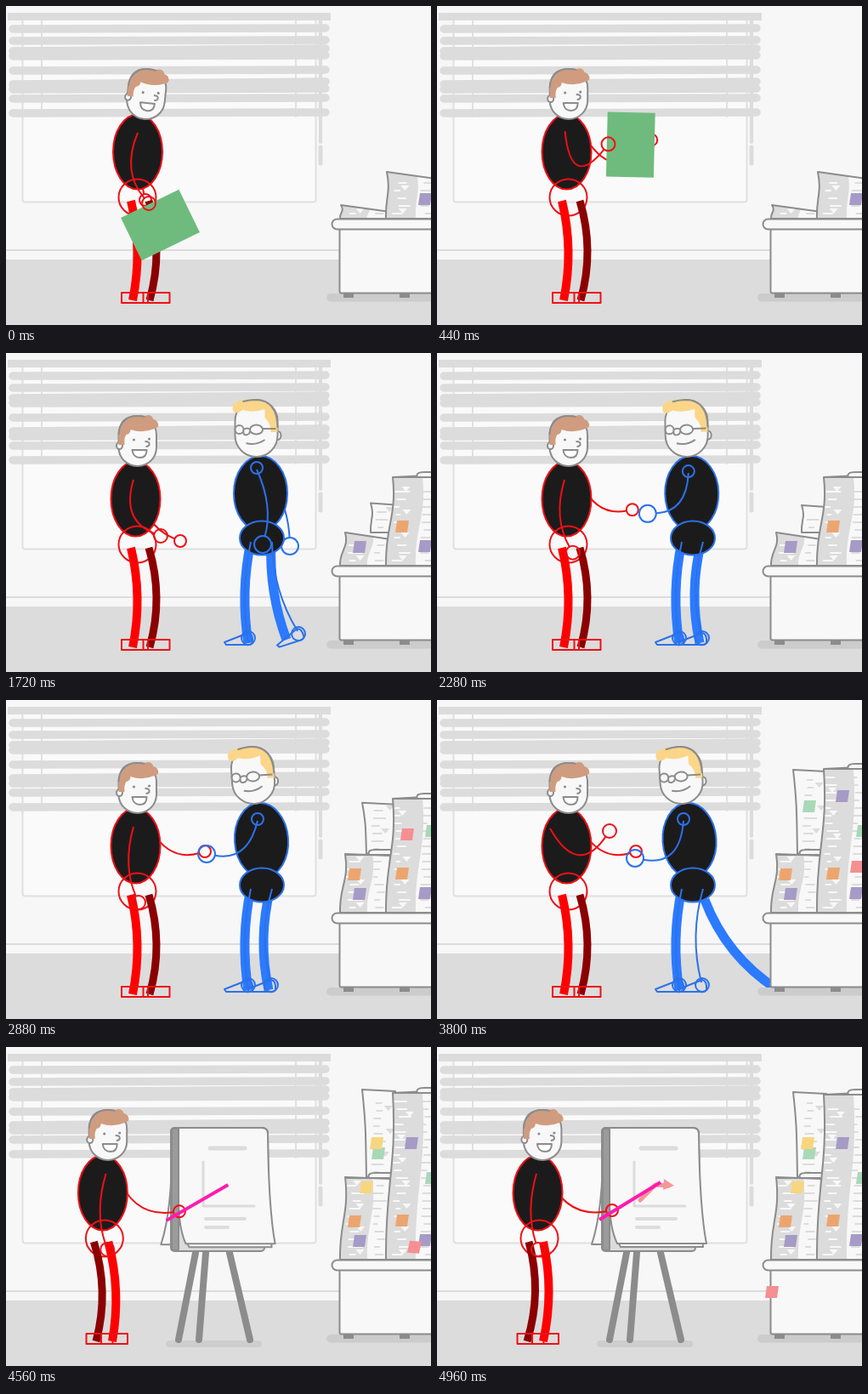
Write an HTML page with a canvas that moves like this. It is 500 px wide and 375 px high and loops after 5 s.

```html
<!DOCTYPE html>
<html lang="en">
<head>
<meta charset="utf-8">
<title>Office</title>
<style>
html, body { margin: 0; width: 100%; height: 100%; overflow: hidden; background: #f7f7f7; }
canvas { display: block; width: 500px; height: 375px; }
</style>
</head>
<body>
<canvas id="stage" width="500" height="375"></canvas>
<script>
const c = document.getElementById('stage').getContext('2d');
const LOOP = 5000, STEP = 40;
const INK = '#8c8c8c', PALE = '#dcdcdc', WHITE = '#f8f8f8', BLACK = '#1c1b1c';
const RED = '#ee1015', BLUE = '#2b72ea', BRIGHT = '#2b7aff';
const PURPLE = '#a69bc6', ORANGE = '#eda56f', GREEN = '#a9d8b8', YELLOW = '#f8d67e', PINK = '#f58f91';
const start = performance.now();
let t = 0;

// Timing: every move is an eased ramp from time a to time b.
const part = (a, b) => Math.max(0, Math.min(1, (t - a) / (b - a)));
function ramp(a, b) {
  const u = part(a, b);
  return u * u * (3 - 2 * u);
}
function pop(a, length = 420) {
  const u = part(a, a + length) - 1;
  return 1 + 2.7 * u ** 3 + 1.7 * u ** 2;
}
// Passes through poses; each move is [from, to, pose].
const pose = (first, ...moves) => moves.reduce(
  (now, [a, b, next]) => now.map((v, i) => v + (next[i] - v) * ramp(a, b)), first);
const noise = n => { const v = Math.sin(n * 12.9898) * 43758.5453; return v - Math.floor(v); };

function paint(fill, stroke, width = 2) {
  if (fill) { c.fillStyle = fill; c.fill(); }
  if (stroke) { c.strokeStyle = stroke; c.lineWidth = width; c.stroke(); }
}
function shape(d, fill, stroke, width = 2) {
  const p = new Path2D(d);
  if (fill) { c.fillStyle = fill; c.fill(p); }
  if (stroke) { c.strokeStyle = stroke; c.lineWidth = width; c.stroke(p); }
}
function line(x1, y1, x2, y2, color, width, cap = 'round') {
  c.lineCap = cap;
  c.beginPath(); c.moveTo(x1, y1); c.lineTo(x2, y2);
  paint(null, color, width);
}
function oval(x, y, rx, ry, fill, stroke) {
  c.beginPath(); c.ellipse(x, y, rx, ry, 0, 0, 7);
  paint(fill, stroke);
}
function box(x, y, w, h, r, fill, stroke) {
  c.beginPath(); c.roundRect(x, y, w, h, r);
  paint(fill, stroke);
}
function at(x, y, angle, draw) {
  c.save(); c.translate(x, y); c.rotate(angle * Math.PI / 180); draw(); c.restore();
}

// A rubber limb, bent sideways from its straight line and cut short by gap.
function limb([x, y, ex, ey, bend], color, width = 2, gap = 0) {
  const d = Math.hypot(ex - x, ey - y);
  const mx = (x + ex) / 2 - (ey - y) / d * bend, my = (y + ey) / 2 + (ex - x) / d * bend;
  const k = gap / Math.hypot(ex - mx, ey - my);
  c.lineCap = 'butt';
  c.beginPath(); c.moveTo(x, y);
  c.quadraticCurveTo(mx, my, ex - (ex - mx) * k, ey - (ey - my) * k);
  paint(null, color, width);
}
function arm(p, r, color) {
  limb(p, color, 2, r);
  oval(p[2], p[3], r, r, null, color);
}

function room() {
  c.fillStyle = '#f7f7f7'; c.fillRect(0, 0, 500, 375);
  c.fillStyle = PALE; c.fillRect(0, 298, 500, 77);
  line(0, 287, 500, 287, PALE, 2);
  box(19.5, 10, 345, 220.5, 3, '#fafafa', '#e0e0e0');
  for (const x of [42, 341]) line(x, 17, x, 130, '#e0e0e0', 2);
  c.fillStyle = PALE; c.fillRect(2, 8, 380, 9);
  for (const y of [27, 41, 59, 76, 98, 109, 126]) line(8, y, 376, y - 1, PALE, 9.5);
  for (const y of [53, 92]) line(8, y, 376, y - 3, PALE, 9.5);
  line(370, 17, 370, 160, PALE, 4);
  line(370, 166, 370, 185, PALE, 5);
}

const shake = () => t > 2650 && t < 3800 ? 5 * Math.sin((t - 2880) / 460 * 2 * Math.PI) : 0;

function redHead(x, angle) {
  at(x, 104, angle, () => {
    box(-22, -30, 44.5, 59, 22, WHITE, INK);
    oval(-21, 5, 3.5, 4, WHITE, INK);
    shape('M-22 4H-15Q-16-4-13-8Q-8-9-8-14Q6-9 20-15Q27-17 24-22Q23-25 19-26Q16-33 9-30Q-14-34-22-10Z', '#cf9c7f');
    shape('M-22-8Q-21-30 0-30Q6-30 9-29', null, INK);
    oval(-4, -2, 1.6, 1.6, INK);
    oval(14, -3, 1.6, 1.6, INK);
    shape('M9 0Q15 0 14 4Q13 6 10 6', null, INK);
    shape('M-6 10H11Q11 19 3 19Q-5 19-6 10Z', '#fff', INK);
  });
}

function redMan() {
  const unwind = 1 - ramp(0, 480);
  const retreat = ramp(4060, 4470), back = ramp(3940, 4470);
  const shift = 6 * ramp(4480, 4740) - 40 * retreat;
  const body = 152.5 + 2.5 * unwind + shift, hip = 154.5 + shift;

  const rear = pose([165, 150, 164, 228, 10],
    [0, 560, [172, 148, 264, 148, 65]],
    [1240, 1680, [160, 150, 205, 221, 30]],
    [1900, 2400, [172, 155, 234, 178, 25]],
    [3840, 4140, [150, 150, 152, 227, 10]],
    [4260, 4600, [130, 150, 206, 192, 35]]);
  rear[3] += shake();
  arm(rear, 7, RED);
  oval(body, 171.5, 29, 44, BLACK, RED);
  oval(hip, 225, 22, 21.5, null, RED);

  const darkFoot = 169 - 63 * back, foot = 149 - 24 * retreat;
  limb([hip + 13.5 - 26 * retreat, 229, darkFoot, 346, -17], '#8b0000', 9);
  limb([hip - 7.5 + 12 * retreat, 229, foot, 346, -13], '#f00', 10);
  box(foot - 13, 337, 31, 12, 0, null, RED);
  at(darkFoot + 8 - 4 * back, 343, 15 * Math.sin(Math.PI * back), () => box(-15.5, -6, 31, 12, 0, null, RED));

  const lift = ramp(0, 560), gone = ramp(1240, 1740);
  if (gone < 1) {
    at(181.5 + 52.5 * lift - 2 * gone, 257.5 - 107 * lift - 28 * gone, 64 - 71 * lift, () => {
      c.scale(1 - gone, 1 - gone);
      c.fillStyle = '#6fbb7d'; c.fillRect(-28, -38, 56, 76);
    });
  }
  arm(pose([155, 149, 168, 232, 26],
    [0, 560, [150, 147, 206, 153, 70]],
    [1240, 1680, [150, 149, 182, 215, 34]],
    [1900, 2400, [150, 149, 156, 238, 16]],
    [3300, 3700, [133, 151, 203, 154, 56]],
    [3860, 4160, [132, 149, 125, 237, 17]],
    [4240, 4600, [117, 149, 119, 238, 14]]), 8, RED);
  redHead(154.5 + 10.5 * unwind + 0.9 * shift, 6 * unwind);

  if (t >= 3960) {
    const [x1, y1, x2, y2] = pose([133, 226, 218, 235], [4260, 4600, [191, 203, 263, 159]]);
    line(x1, y1, x2, y2, '#ff1cae', 4, 'butt');
  }
}

function blueHead(x, angle) {
  at(x, 88, angle, () => {
    oval(25, 9, 4, 5, WHITE, INK);
    box(-25, -33, 50, 67, 25, WHITE, INK);
    shape('M-27-19Q-31-30-18-32Q-8-35 0-33Q23-33 25-8V5H17Q18-4 10-12V-22Q-4-17-16-21Q-22-16-27-19Z', '#fbd689');
    shape('M-16-31Q-8-33 0-33Q25-32 25 0', null, INK);
    shape('M7 1H23', null, INK);
    oval(-20, 2, 5, 5, WHITE, INK);
    oval(0, 2, 7.5, 5.5, WHITE, INK);
    shape('M-15 2Q-11-1-7 2M-15 4Q-16 9-11 8Q-7 7-8 4', null, INK);
    shape('M-12 18Q0 21 10 14', null, INK);
  });
}

function shoe(x, y, angle) {
  at(x, y, angle, () => {
    shape('M-28 5L0-6Q6-5 5 6Q2 9-2 8H-26Z', null, BLUE);
    oval(0, 0, 8, 8, null, BLUE);
  });
}

function blueMan() {
  const dx = 235 * (1 - ramp(1160, 1700) + ramp(3820, 4160));
  if (dx >= 235) return;
  const stride = Math.min(1, dx / 60) * Math.sin(t / 70) * 18;
  const settle = ramp(1720, 2000), lean = ramp(2000, 2880), pull = ramp(2880, 3800);
  const footX = 344 - 32 * settle - stride, footY = 330 + 5 * settle;
  const leftLeg = [288, 222, 285 + stride, 341, 11];
  const rightLeg = pose([312, 222, 330, 337, 12],
    [1720, 2000, [311, 222, 309, 341, 14]],
    [3540, 3800, [315, 235, 400, 340, 22]]);
  const near = pose([295, 137, 302, 225, -16],
    [1900, 2420, [296, 142, 236, 181, -34]],
    [2880, 3800, [290, 142, 233, 186, -40]]);
  near[3] += shake();

  c.save();
  c.translate(dx, 0);
  arm(pose([315, 150, 334, 227, -8], [1740, 2100, [310, 150, 304, 195, 0]]), 10, BLUE);
  at(299.5 + lean - 3.5 * pull, 165, -4 * lean, () => oval(0, 0, 31.5, 44, BLACK, BLUE));
  limb(rightLeg, BRIGHT, 11);
  limb(leftLeg, BRIGHT, 11);
  oval(301, 217.5, 26, 20, BLACK, BLUE);
  limb(leftLeg, BLUE);
  limb([313, 222, footX - 1, footY - 3, 15], BLUE);
  shoe(leftLeg[2], 335, 0);
  shoe(footX, footY, -18 * (1 - settle));
  oval(near[0], near[1] - 2, 7, 7, null, BLUE);
  arm(near, 10, BLUE);
  blueHead(294.5 - 4 * lean - 3.5 * pull, -4 * lean);
  c.restore();
}

function flipchart() {
  if (t < 3960) return;
  const swing = 2 * ramp(3960, 4200) - 1 - 1.3 * ramp(4200, 4400) + 0.3 * ramp(4400, 4600);
  const write = ramp(4200, 4560), arrow = ramp(4560, 4920);
  box(188, 345, 113, 8, 4, '#cecece');
  c.save();
  c.translate(0, 350); c.scale(1, pop(3900, 280)); c.translate(0, -350);
  for (const [top, foot] of [[223, 203], [235, 227], [263, 287]]) line(top, 242, foot, 344, INK, 8);
  const y = 231 - 8 * swing, right = 317 + 13 * swing, left = 212 + 16 * swing;
  shape(`M195 110Q196 ${190 - 10 * swing} ${182 - 10 * swing} ${y + 1}H200Z`, WHITE, INK);
  box(194, 95, 110, 145, 4, PALE, INK);
  for (const d of [4, 0]) {
    shape(`M203 95H301Q308 95 308 102Q309 ${190 - 10 * swing} ${right - d} ${y + d}H${left + d}Q203 ${212 - 5 * swing} 203 180Z`, WHITE, INK);
  }
  box(195, 96, 8, 143, 2, '#9b9b9b', INK);
  line(240, 116 + 3 * write, 241 + 40 * write, 116 + 3 * write, PALE, 5);
  c.lineJoin = 'round';
  shape(`M${230 + 2 * write} ${132 + 3 * write}L${234 - 2 * write} ${188 - write}L${297 - 5 * write} ${183 + 4 * write}`, null, PALE, 3);
  const text = Math.max(0, 2 * write - 1);
  if (text) [46, 26].forEach((w, i) => line(235, 202 + 10 * i, 235 + w * text, 202 + 10 * i, PALE, 4));
  c.beginPath(); c.rect(236, 145, 44 * arrow, 45); c.clip();
  shape('M239 180L257 162L273 163', null, '#f4979a', 5);
  shape('M267 155L279 163L266 168Z', '#f4979a');
  c.restore();
}

function desk() {
  box(377, 338, 140, 9.5, 5, '#cccccc');
  c.fillStyle = INK;
  for (const x of [397, 463]) c.fillRect(x, 337, 12, 6);
  box(392.5, 256, 120, 81.5, 2, WHITE, INK);
  box(383.5, 250.5, 130, 12, 6, WHITE, INK);
}

function pile(xl, xr, top, base, lean, strip, tilt, seed) {
  const h = base - top;
  if (h < 3) return;
  const edge = `C${xl - 1} ${base - 0.45 * h} ${xl + lean + 5} ${top + 0.45 * h} ${xl + lean} ${top}`;
  const path = new Path2D(`M${xl} ${base}${edge}L${xr} ${top + tilt}L${xr - lean / 2} ${base}Z`);
  c.fillStyle = WHITE; c.fill(path);
  c.save();
  c.clip(path);
  if (strip) {
    c.translate(strip, 0);
    shape(`M${xl} ${base}${edge}H${xl - 60}V${base}Z`, PALE);
    c.translate(-strip, 0);
  }
  for (let y = base - 6, i = seed; y > top + 8; y -= 9, i++) {
    const a = xl + 6 + noise(i) * 10, b = xl + strip + 6 + noise(i + 50) * 7;
    line(a, y, a + 4 + noise(i + 9) * 12, y, WHITE, 2);
    line(b, y, b + 4 + noise(i + 20) * 11, y, PALE, 2);
    if (i % 3 === 0) shape(`M${a + 7} ${y - 6}h10l-5 6z`, strip ? WHITE : PALE);
  }
  c.restore();
  c.lineJoin = 'round';
  c.strokeStyle = INK; c.lineWidth = 2; c.stroke(path);
}

function curl(x, y, w) {
  shape(`M${x} ${y}H${x + w * 0.5}Q${x + w * 0.45} ${y - 6} ${x + w * 0.65} ${y - 6}H${x + w}V${y}Z`, WHITE, INK);
}

function note(x, y, color, size = 1, turn = 0) {
  at(x, y, turn, () => { c.scale(size, size); shape('M-6-7H8L6 7H-8Z', color); });
}

function papers() {
  const first = ramp(500, 800), second = ramp(2480, 2700);
  const low = 234 - 23 * pop(560) - 30 * pop(2300) - 28 * pop(3940);
  const high = 212 - 33 * pop(1420) - 58 * pop(2480) - 38 * pop(3440) - 30 * pop(4300);
  const main = 195 - 49 * pop(520) - 30 * pop(2480) - 34 * pop(3440) - 26 * pop(4260);

  if (t > 1420) pile(429 - 5 * second, 458, high, low, -5 * second, 0, 2, 31);
  pile(393, 452, low, 250, 1 + 5 * first, 32, 8 - 6 * second, 3);
  if (t > 2560) curl(401, low + 1, 52);
  pile(447, 512, main, 250, 1 + 7 * first, 35, 9 - 12 * first, 12);
  if (t > 700) curl(456, main, 56);

  const stick = (x, y, color, born) => {
    if (t > born) note(x, y, color, part(born, born + 120));
  };
  stick(493, 227, PURPLE, -200);
  stick(466, 204, ORANGE, 780);
  stick(416, 228, PURPLE, 1300);
  stick(410, 205, ORANGE, 2400);
  stick(501, 154, GREEN, 2760);
  stick(477, 113, PURPLE, 3640);
  stick(438, 125, GREEN, 3640);
  stick(436, 113, YELLOW, 3960);
  stick(424, 165, YELLOW, 4400);

  if (t >= 2720) {
    const slide = ramp(3400, 3800), fall = ramp(4440, 4960);
    note(472 + 22 * slide - 100 * fall,
      130 + 28 * ramp(2720, 2880) + 38 * slide + 31 * ramp(3800, 4200) + 61 * fall,
      PINK, 1, 10 * Math.sin(Math.PI * fall));
  }
}

function frame() {
  t = Math.floor((performance.now() - start) % LOOP / STEP) * STEP;
  for (const draw of [room, flipchart, redMan, blueMan, desk, papers]) draw();
  requestAnimationFrame(frame);
}
frame();
</script>
</body>
</html>
```
